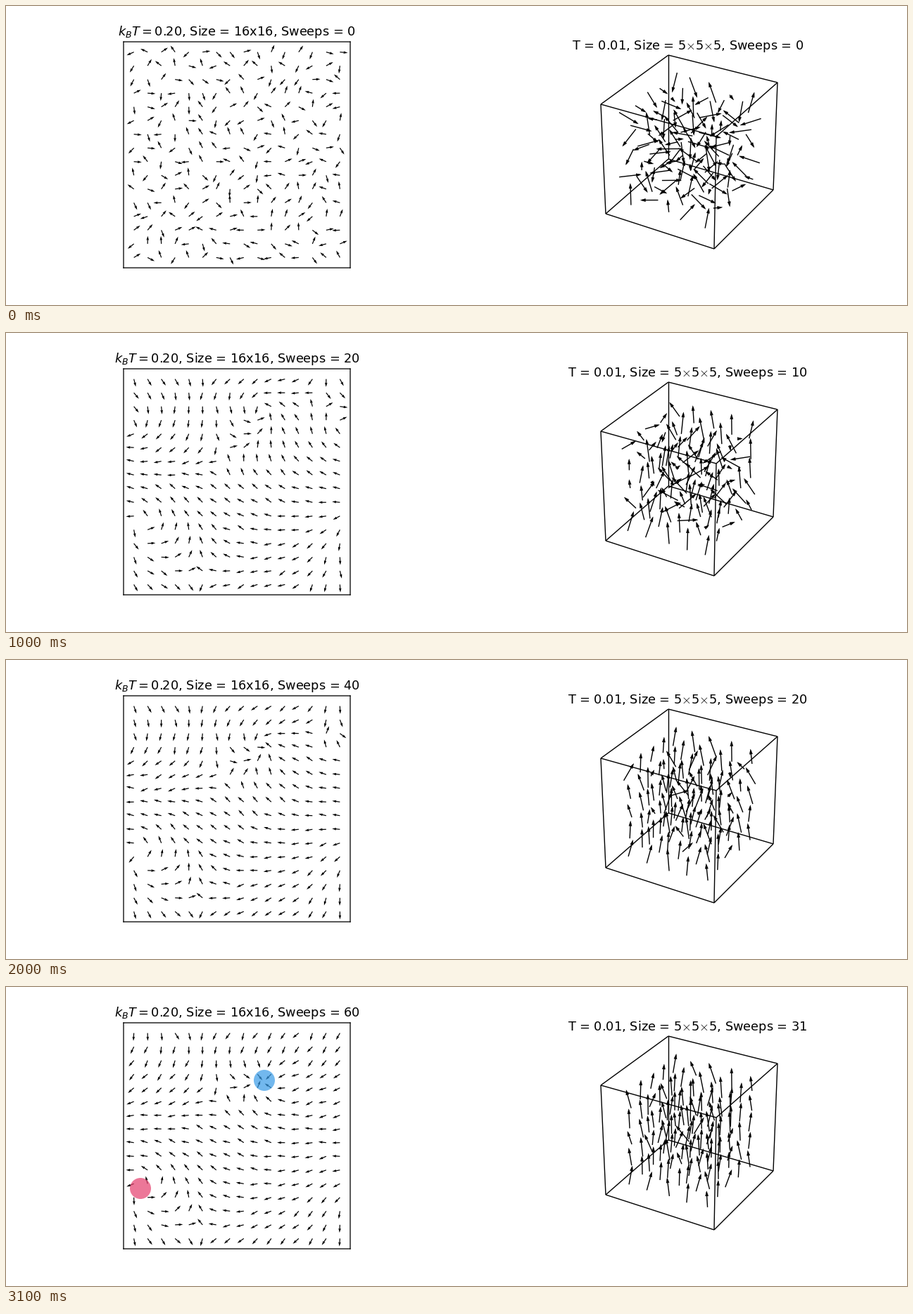
Recreate the animation shown at these times as a matplotlib script. Size 1280x426 px, loop 6.1 s.

```python
import itertools
import numpy as np
import matplotlib.pyplot as plt
from matplotlib.animation import FuncAnimation
from matplotlib.collections import LineCollection, PolyCollection
from matplotlib.patches import Circle

W, H, DPI = 1280, 426, 128
LAST, FRAMES = 31, 61
ORDERED = 7
PX = 72 / DPI
rng = np.random.default_rng(16)

# ---- planar spins: a periodic field of drifting vortices ----
N = 16
col, row = np.meshgrid(np.arange(N), np.arange(N))
grid = col + 1j * (N - 1 - row)

# charge, then column and row at the start and at the end of the drift
DRIFT = [(1, (9.2, 2.2), (9.5, 3.5)),
         (1, (0.5, 10.5), (0.5, 11.5)),
         (-1, (6.5, 5.7), (6.5, 4.3)),
         (-1, (4.6, 14.4), (4.8, 14.3))]
PAIR = [(1, (15.5, 3.5), (14.5, 2.3)),
        (-1, (13.5, 1.3), (14.5, 2.3))]


def unit(z):
    return z / np.maximum(np.abs(z), 1e-9)


def whirl(z):
    """Unit phase of one vortex, repeated along both axes."""
    return np.prod([unit(np.sin(np.pi * (z + 1j * N * n) / N)) for n in (-1, 0, 1)],
                   axis=0)


def target(k):
    t = np.clip((k - ORDERED) / (LAST - ORDERED), 0, 1)
    merge = np.clip((k - ORDERED) / 17, 0, 1) ** 3
    field = np.exp(1j * np.radians(252)) * np.ones((N, N))
    dipole = 0
    for group, s in ((DRIFT, t), (PAIR, merge)):
        for charge, start, end in group:
            x, y = np.array(start) * (1 - s) + np.array(end) * s
            z = whirl(grid - (x + 1j * (N - 1 - y)))
            field = field * (z if charge > 0 else z.conj())
            dipole += charge * x
    slope = -2 * np.pi * dipole / N ** 2
    return field * np.exp(1j * slope * (grid.imag - 7.5))


def planar_states():
    z = np.exp(2j * np.pi * rng.random((N, N)))
    noise = rng.normal(0, 0.13, (N, N))
    states = [z]
    for k in range(1, LAST):
        fresh = rng.random((N, N)) < 0.5
        noise = np.where(fresh, rng.normal(0, 0.13, (N, N)), noise)
        if k < ORDERED:
            near = sum(np.roll(z, s, a) for s in (1, -1) for a in (0, 1))
            z = unit(z + 0.4 * near + 0.3 * k * target(k))
        else:
            z = target(k)
        states.append(z * np.exp(1j * noise))
    return states + [states[-1]]


# ---- spatial spins: Metropolis updates with an upward pull ----
M, TEMP, PULL = 5, 0.01, 2.5


def normed(v):
    return v / np.linalg.norm(v, axis=-1, keepdims=True)


def cube_states():
    s = normed(rng.normal(size=(M, M, M, 3)))
    states = [s.copy()]
    steps = [d * sign for d in np.eye(3, dtype=int) for sign in (1, -1)]
    for _ in range(LAST):
        for p in itertools.product(range(M), repeat=3):
            field = np.array([0, 0, PULL]) + sum(s[tuple((np.array(p) + d) % M)]
                                                 for d in steps)
            new = normed(normed(rng.normal(size=3)) + rng.choice([0, 2]) * s[p])
            gain = (new - s[p]) @ field
            if gain > 0 or rng.random() < np.exp(gain / TEMP):
                s[p] = new
        states.append(s.copy())
    return states


# Perspective fitted to the cube corners, axes (left, right, up) from the back corner.
CORNERS = {(0, 0, 1): (941, 70), (0, 1, 1): (1096, 109),
           (1, 0, 1): (845, 140), (1, 1, 1): (1009, 186),
           (0, 0, 0): (941, 218), (0, 1, 0): (1090, 262),
           (1, 0, 0): (852, 296), (1, 1, 0): (1006, 346)}


def fit_camera():
    lhs, rhs = [], []
    for p, (x, y) in CORNERS.items():
        p = np.array(p, float)
        h, o = np.append(p, 1), np.zeros(4)
        lhs += [np.r_[h, o, -x * p], np.r_[o, h, -y * p]]
        rhs += [x, y]
    m = np.linalg.lstsq(np.array(lhs), np.array(rhs, float), rcond=None)[0]
    return np.append(m, 1).reshape(3, 4)


CAMERA = fit_camera()
PITCH = 0.175
centers = 0.15 + PITCH * np.array(list(itertools.product(range(M), repeat=3)))


def project(p):
    q = np.c_[p, np.ones(len(p))] @ CAMERA.T
    return q[:, :2] / q[:, 2:]


def cube_arrows(s):
    half = s.reshape(-1, 3) * PITCH / 2
    tail, tip = project(centers - half), project(centers + half)
    d = tip - tail
    d /= np.maximum(np.linalg.norm(d, axis=1, keepdims=True), 1e-6)
    side = 2.1 * d[:, ::-1] * [-1, 1]
    base = tip - 7 * d
    heads = np.stack([tip, base + side, base - side], axis=1)
    return np.stack([tail, tip - 2 * d], axis=1), heads


planar, cube = planar_states(), cube_states()

# ---- stage ----
fig = plt.figure(figsize=(W / DPI, H / DPI), dpi=DPI, facecolor="white")
stage = fig.add_axes([0, 0, 1, 1])
stage.set(xlim=(0, W), ylim=(H, 0))
stage.axis("off")
stage.set_zorder(2)

panel = fig.add_axes([167 / W, (H - 373) / H, 322 / W, 322 / H])
panel.set(xlim=(-0.75, 15.75), ylim=(15.75, -0.75), xticks=[], yticks=[])
for spine in panel.spines.values():
    spine.set_linewidth(1.3 * PX)
    spine.set_snap(False)
spins = panel.quiver(col, row, planar[0].real, planar[0].imag,
                     scale=28.8, width=0.00375)

dots = [Circle(c, 15, color=rgb, alpha=0.7, lw=0)
        for c, rgb in (((367, 133), "#379be7"), ((191, 287), "#e53e6c"))]
for dot in dots:
    stage.add_patch(dot)

edges = [(CORNERS[a], CORNERS[b]) for a, b in itertools.combinations(CORNERS, 2)
         if sum(i != j for i, j in zip(a, b)) == 1]
shafts = LineCollection([], colors="black", linewidths=1.4 * PX)
heads = PolyCollection([], facecolors="black", edgecolors="black", linewidths=0.4 * PX)
for part in (LineCollection(edges, colors="black", linewidths=1.4 * PX), shafts, heads):
    stage.add_collection(part, autolim=False)

label = dict(fontsize=10, family="DejaVu Sans", ha="center", va="baseline")
title_2d = stage.text(328.3, 42.2, "", **label)
title_3d = stage.text(968.5, 62, "", math_fontfamily="cm", **label)


def draw(i):
    k = min(i, LAST)
    spins.set_UVC(planar[k].real, planar[k].imag)
    lines, tips = cube_arrows(cube[k])
    shafts.set_segments(lines)
    heads.set_verts(tips)
    title_2d.set_text(rf"$k_BT=0.20$, Size = 16x16, Sweeps = {min(2 * k, 60)}")
    title_3d.set_text(rf"T = 0.01, Size = 5$\times$5$\times$5, Sweeps = {k}")
    for dot in dots:
        dot.set_visible(k == LAST)
    return [spins, shafts, heads, title_2d, title_3d, *dots]


anim = FuncAnimation(fig, draw, frames=FRAMES, interval=100, repeat=True,
                     repeat_delay=0, init_func=lambda: draw(0))
plt.show()
```
